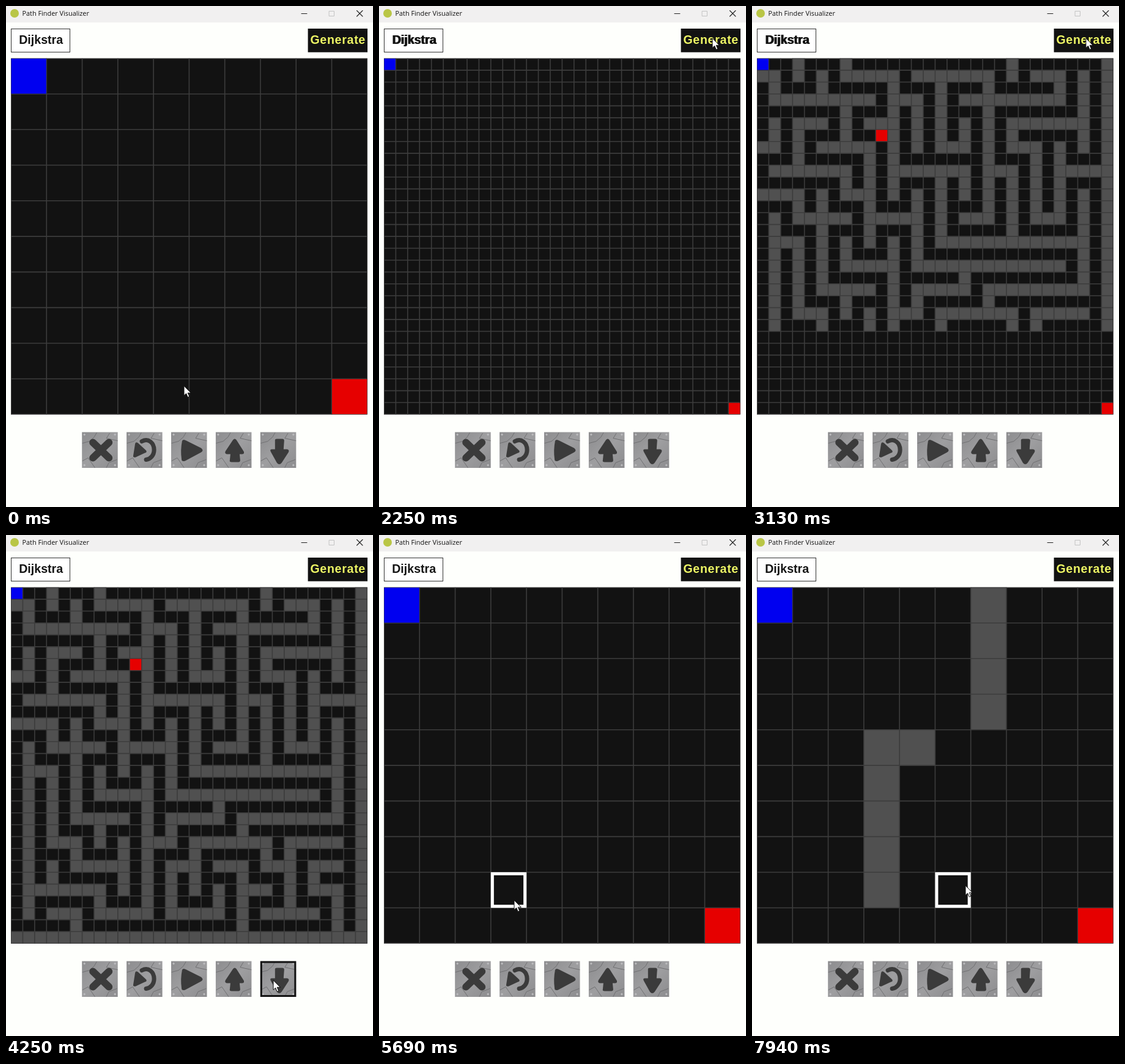
Animation, 600 px wide and 820 px high, one loop 8000 ms. Source, as an HTML page with a canvas:

```html
<!DOCTYPE html>
<html lang="en">
<head>
<meta charset="utf-8">
<title>Path Finder Visualizer</title>
<style>
  html, body { margin: 0; width: 100%; height: 100%; overflow: hidden; background: #fefffc; }
  canvas { display: block; }
</style>
</head>
<body>
<canvas id="stage" width="600" height="820"></canvas>
<script>
const ctx = document.getElementById('stage').getContext('2d');
const LOOP = 8000;
const GRID = { x: 8, y: 85.7, size: 582.8 };
const BUTTON = { x: 124.2, y: 697.5, size: 58.5, gap: 72.9 };
const COLOR = { floor: '#121212', line: '#3c3c3c', wall: '#505050', start: '#0000f0', end: '#e60000', icon: '#3b3b3b' };
const FONT = 'bold 19.6px "Liberation Sans", Arial, sans-serif';

// Pointer stops: time, x, y
const stops = [
  [0, 291, 622], [650, 368, 728], [1400, 366, 730], [2100, 545, 53], [3300, 546, 53],
  [3920, 444, 772], [4200, 437, 729], [4900, 437, 728], [5690, 221, 598], [6070, 214, 348],
  [6310, 387, 346], [6640, 388, 108], [6940, 348, 383], [7120, 395, 350], [7300, 330, 350],
  [7940, 349, 574], [LOOP, 349, 574]
];

function pointerAt(t) {
  const i = Math.max(1, stops.findIndex(stop => stop[0] >= t));
  const [t0, x0, y0] = stops[i - 1], [t1, x1, y1] = stops[i];
  const p = (t - t0) / (t1 - t0);
  const eased = p * p * (3 - 2 * p);
  return { x: x0 + (x1 - x0) * eased, y: y0 + (y1 - y0) * eased };
}

function seededRandom(seed) {
  return () => (seed = (seed * 16807) % 2147483647) / 2147483647;
}

// Depth-first maze: rooms on even cells, walls between them and on the last row and column.
function makeMaze(seed) {
  const size = 30, rand = seededRandom(seed);
  const wall = Array.from({ length: size }, () => Array(size).fill(true));
  const trail = [[0, 0]];
  wall[0][0] = false;
  while (trail.length) {
    const [c, r] = trail[trail.length - 1];
    const steps = [[1, 0], [-1, 0], [0, 1], [0, -1]]
      .filter(([dc, dr]) => (c + 2 * dc) in wall && wall[r + 2 * dr]?.[c + 2 * dc]);
    if (!steps.length) { trail.pop(); continue; }
    const [dc, dr] = steps[Math.floor(rand() * steps.length)];
    wall[r + dr][c + dc] = wall[r + 2 * dr][c + 2 * dc] = false;
    trail.push([c + 2 * dc, r + 2 * dr]);
  }
  return wall;
}

const mazes = [
  { time: 2250, end: [8, 24], wall: makeMaze(7193) },
  { time: 2850, end: [10, 6], wall: makeMaze(2917) }
];
const ROW_TIME = 12.2;

function gridCount(t) {
  if (t < 700 || t >= 4720) return 10;
  return t < 1000 || t >= 4450 ? 20 : 30;
}

function cellAt({ x, y }, count) {
  const step = GRID.size / count;
  return [Math.floor((x - GRID.x) / step), Math.floor((y - GRID.y) / step)];
}

// Replays the drag that paints walls and the later one that erases them.
function paintedWalls(t) {
  const cells = new Set();
  for (let s = 5700; s <= t; s += 10) {
    const key = cellAt(pointerAt(s), 10).join();
    if (s < 6660) cells.add(key);
    else if (s > 7100 && s < 7320) cells.delete(key);
  }
  return cells;
}

function fillRect(color, x, y, w, h) {
  ctx.fillStyle = color;
  ctx.fillRect(x, y, w, h);
}

function strokeRect(color, width, x, y, w, h) {
  ctx.strokeStyle = color;
  ctx.lineWidth = width;
  ctx.strokeRect(x + width / 2, y + width / 2, w - width, h - width);
}

function text(value, x, y, font, color, spacing = 0) {
  ctx.font = font;
  ctx.letterSpacing = `${spacing}px`;
  ctx.fillStyle = color;
  ctx.fillText(value, x, y);
}

function path(d, { fill, stroke, width = 1, x = 0, y = 0 }) {
  ctx.save();
  ctx.translate(x, y);
  ctx.lineJoin = ctx.lineCap = 'round';
  const shape = new Path2D(d);
  if (fill) { ctx.fillStyle = fill; ctx.fill(shape); }
  if (stroke) { ctx.strokeStyle = stroke; ctx.lineWidth = width; ctx.stroke(shape); }
  ctx.restore();
}

function drawHeader(t) {
  fillRect('#f1f0f0', 0, 0, 600, 27);
  ctx.fillStyle = '#b9c646';
  ctx.beginPath();
  ctx.arc(14, 12, 7, 0, 7);
  ctx.fill();
  text('Path Finder Visualizer', 26.5, 16.3, '10.9px "Open Sans", sans-serif', '#111');
  path('M483 12.5H492', { stroke: '#222' });
  path('M528.5 8.5H536.5V16.5H528.5Z', { stroke: '#c4c4c4' });
  path('M573.5 7.5L583 17M583 7.5L573.5 17', { stroke: '#222', width: 1.1 });

  fillRect('#fff', 8, 37, 97, 39);
  strokeRect('#333', 1, 8, 37, 97, 39);
  text('Dijkstra', 21.2, 62, FONT, '#141414');
  if (t >= mazes[0].time && t < 3400) text('Dijkstra', 22.4, 62, FONT, '#141414');
  fillRect('#121212', 493.6, 37, 97.4, 38.7);
  text('Generate', 497.4, 62, FONT, '#edf564', 0.7);
}

function drawGrid(t) {
  const count = gridCount(t), step = GRID.size / count;
  const cell = (color, c, r, inset = 0) => fillRect(color,
    GRID.x + c * step + inset, GRID.y + r * step + inset, step - 2 * inset, step - 2 * inset);
  fillRect(COLOR.floor, GRID.x, GRID.y, GRID.size, GRID.size);

  let ends = [[count - 1, count - 1]];
  const maze = count === 30 && mazes.findLast(m => t >= m.time);
  if (maze) {
    const rows = Math.min(30, Math.floor((t - maze.time) / ROW_TIME));
    for (let r = 0; r < rows; r++) {
      maze.wall[r].forEach((solid, c) => solid && cell(COLOR.wall, c, r));
    }
    if (rows === 30) ends = [];
    if (rows > maze.end[1]) ends.push(maze.end);
  }
  if (count === 10) {
    for (const key of paintedWalls(t)) cell(COLOR.wall, ...key.split(','));
  }

  ctx.strokeStyle = COLOR.line;
  ctx.lineWidth = 1.6;
  ctx.beginPath();
  for (let i = 1; i < count; i++) {
    const p = i * step;
    ctx.moveTo(GRID.x + p, GRID.y);
    ctx.lineTo(GRID.x + p, GRID.y + GRID.size);
    ctx.moveTo(GRID.x, GRID.y + p);
    ctx.lineTo(GRID.x + GRID.size, GRID.y + p);
  }
  ctx.stroke();
  strokeRect(COLOR.line, 1, GRID.x, GRID.y, GRID.size, GRID.size);
  cell(COLOR.start, 0, 0, 0.5);
  for (const [c, r] of ends) cell(COLOR.end, c, r, 0.5);

  if (t > 4900) {
    const [c, r] = cellAt(pointerAt(t), count);
    if (r >= 0 && r < count) strokeRect('#fff', 5, GRID.x + c * step, GRID.y + r * step, step, step);
  }
}

const icons = [
  () => path('M18 17L44 42M44 17L18 42', { stroke: COLOR.icon, width: 12 }),
  () => {
    path('M25 15C36 9 45 18 45 29C45 38 39 44 32 45', { stroke: COLOR.icon, width: 7 });
    path('M11 38L14 19Q15 15 19 18L32 30Q34 33 30 34L15 41Q10 42 11 38Z', { fill: COLOR.icon });
  },
  () => path('M18 14Q20 11 25 14L49 26Q54 30 49 33L23 47Q17 49 17 44Q15 29 18 14Z', { fill: COLOR.icon }),
  () => path('M28 13Q31 9 34 13L46 32Q47 36 43 36H39L40 46Q40 49 37 49H26Q22 49 23 46L24 36H18Q14 35 16 31Z', { fill: COLOR.icon }),
  () => path('M24 13Q24 11 27 11H36Q39 11 39 14L38 28H44Q48 29 46 33L35 50Q31 55 27 50L17 32Q15 28 19 28H24Z', { fill: COLOR.icon })
];

function drawButton(x, drawIcon, hovered) {
  const { y, size } = BUTTON;
  ctx.save();
  ctx.translate(x, y);
  const stone = ctx.createLinearGradient(0, 0, size, size);
  stone.addColorStop(0, '#8c8c8e');
  stone.addColorStop(0.5, '#9e9ea0');
  stone.addColorStop(1, '#8c8c8e');
  fillRect(stone, 0, 0, size, size);
  path('M1 18L12 15L20 8L24 1M45 2L40 10L58 14M1 47L10 42L21 58M40 58L44 50L57 45', { stroke: '#707072' });
  for (const cx of [4, 54]) {
    for (const cy of [4, 54]) path('M0 -2L2 0L0 2L-2 0Z', { x: cx, y: cy, fill: '#bcbcbe' });
  }
  drawIcon();
  if (hovered) strokeRect('#141414', 3, 0, 0, size, size);
  ctx.restore();
}

function drawPointer({ x, y }) {
  path('M0 0V15.5L3.6 12.2L6.2 18.3L8.8 17.2L6.2 11.3H11Z', { x, y, fill: '#fff', stroke: '#111' });
}

function draw(t) {
  const pointer = pointerAt(t);
  fillRect('#fefffc', 0, 0, 600, 820);
  drawHeader(t);
  drawGrid(t);
  icons.forEach((icon, i) => {
    const x = BUTTON.x + i * BUTTON.gap;
    const inside = pointer.x >= x && pointer.x < x + BUTTON.size
      && pointer.y >= BUTTON.y && pointer.y < BUTTON.y + BUTTON.size;
    drawButton(x, icon, inside);
  });
  drawPointer(pointer);
}

const began = performance.now();
function frame() {
  draw((performance.now() - began) % LOOP);
  requestAnimationFrame(frame);
}
frame();
</script>
</body>
</html>
```
